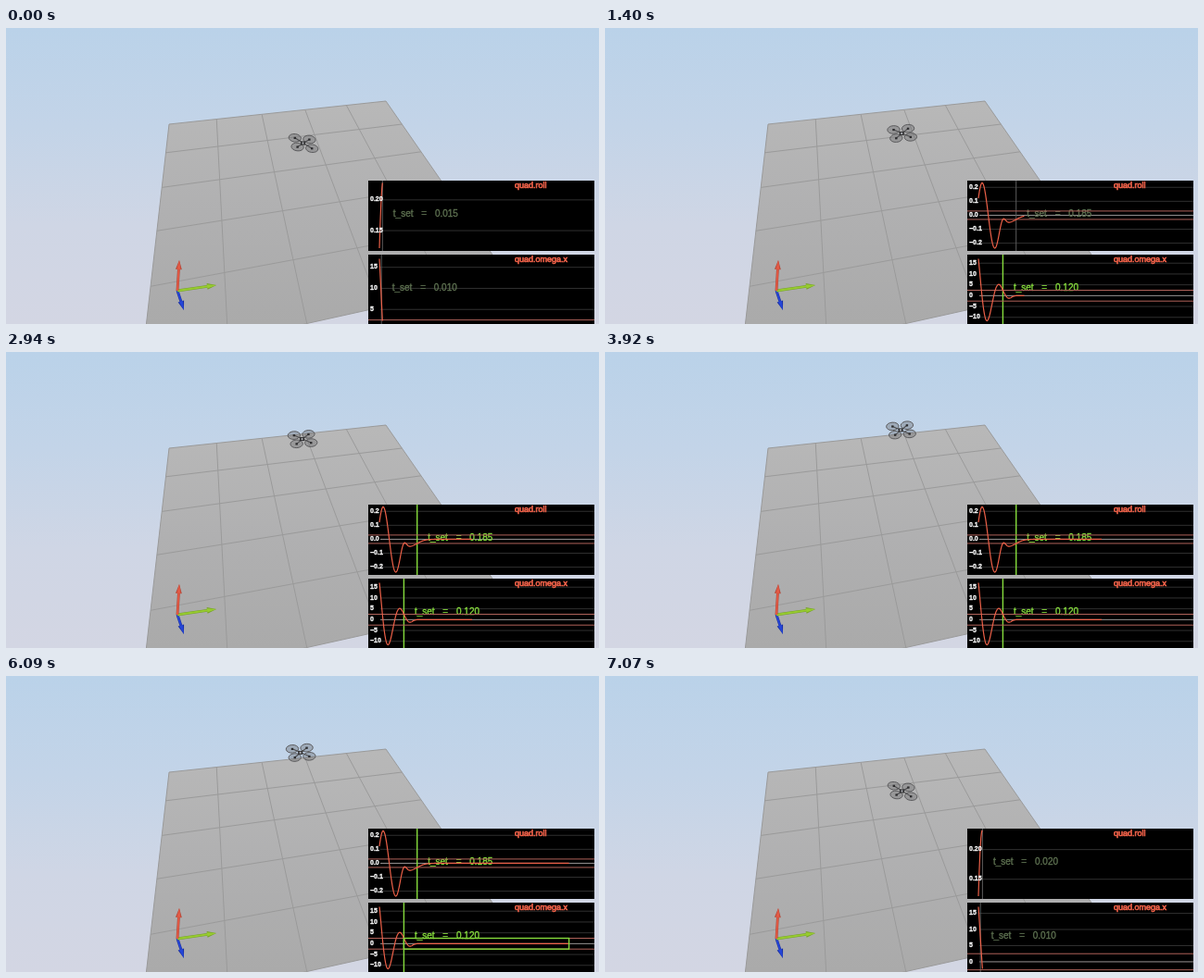
Write an HTML page with a canvas that moves like this. It is 640 by 320 pixels and loops after 7140 ms.

```html
<!DOCTYPE html>
<html lang="en">
<head>
<meta charset="utf-8">
<title>Quadcopter settling</title>
<style>
html, body { margin: 0; width: 100%; height: 100%; overflow: hidden; background: #c8d4e6; }
canvas { display: block; }
</style>
</head>
<body>
<canvas id="stage" width="640" height="320"></canvas>
<script>
const ctx = document.getElementById('stage').getContext('2d');
const STEP = 70, FRAMES = 102, RUN = 100;
const TOMATO = '#ec6048', GREEN = '#86dc3c';
const FONT = '"Liberation Sans", Arial, sans-serif';
const { PI, cos, sin, exp } = Math;

// Roll angle: one slowing swing that dies out, then a shallow dip below zero.
function roll(t) {
  const u = t - .0185;
  const swing = .232 * cos(54 * u - 60 * u * u) * exp(-((t / .12) ** 8));
  return swing - .052 * exp(-(((t - .145) / .055) ** 2));
}

// Roll rate: a damped sine that is cut off once settled.
const omega = t => -21 * exp(-13.4 * t - (t / .16) ** 8) * sin(54 * (t - .0175));

const droneX = p => 320.5 - 3.5 * p ** 1.5;
const droneY = p => 102.2 + 22.3 * cos(PI * (p * 1.37) ** .87);

const plots = [
  { name: 'quad.roll', fn: roll, band: .03, y: 165, h: 76, top: 167.5, bottom: 238, fine: .05, coarse: .1 },
  { name: 'quad.omega.x', fn: omega, band: 2.5, y: 245, h: 75, top: 249.5, bottom: 316.5, fine: 5, coarse: 5 }
];

// Perspective map of the unit square onto the floor's four corners.
function perspective([x0, y0], [x1, y1], [x2, y2], [x3, y3]) {
  const ax = x1 - x2, ay = y1 - y2, bx = x3 - x2, by = y3 - y2;
  const sx = x0 - x1 + x2 - x3, sy = y0 - y1 + y2 - y3, den = ax * by - bx * ay;
  const g = (sx * by - bx * sy) / den, h = (ax * sy - sx * ay) / den;
  return (u, v) => {
    const w = 1 + g * u + h * v;
    return [(x0 + (x1 - x0 + g * x1) * u + (x3 - x0 + h * x3) * v) / w,
            (y0 + (y1 - y0 + g * y1) * u + (y3 - y0 + h * y3) * v) / w];
  };
}
const corners = [[176, 104], [410, 79], [543, 271], [147, 359]];
const floor = perspective(...corners);

function line(color, width, ...pts) {
  ctx.strokeStyle = color;
  ctx.lineWidth = width;
  ctx.beginPath();
  pts.forEach(p => ctx.lineTo(...p));
  ctx.stroke();
}

function fill(color, ...pts) {
  ctx.fillStyle = color;
  ctx.beginPath();
  pts.forEach(p => ctx.lineTo(...p));
  ctx.fill();
}

function text(str, x, y, size, color, edge = .35, weight = '') {
  ctx.font = `${weight} ${size}px ${FONT}`;
  ctx.fillStyle = ctx.strokeStyle = color;
  ctx.lineWidth = edge;
  ctx.fillText(str, x, y);
  ctx.strokeText(str, x, y);
}

function gradient(y0, y1, ...colors) {
  const g = ctx.createLinearGradient(0, y0, 0, y1);
  colors.forEach((c, i) => g.addColorStop(i / (colors.length - 1), c));
  return g;
}

function arrow(x0, y0, x1, y1, color, dark) {
  const len = Math.hypot(x1 - x0, y1 - y0), dx = (x1 - x0) / len, dy = (y1 - y0) / len;
  const bx = x1 - dx * 10, by = y1 - dy * 10;
  const head = (c, w) => fill(c, [x1, y1], [bx - dy * w, by + dx * w], [bx + dy * w, by - dx * w]);
  line(dark, 2.8, [x0, y0], [bx, by]);
  line(color, 1.8, [x0, y0], [bx, by]);
  head(dark, 3.4);
  head(color, 2.2);
}

function scene() {
  ctx.fillStyle = gradient(0, 320, '#bad2e9', '#c3d4e8', '#cfd6e5', '#d3d6e3');
  ctx.fillRect(0, 0, 640, 320);
  fill(gradient(80, 320, '#b8b8b8', '#b0b0b1', '#aaaaaa'), ...corners);
  for (let i = 0; i <= 1; i += .2) {
    line('#9a9a9a', 1, floor(i, 0), floor(i, 1));
    line('#9a9a9a', 1, floor(0, i), floor(1, i));
  }
  arrow(185, 284, 192, 305, '#2546d8', '#182c9c');
  arrow(185, 284, 227, 278, '#98cc30', '#74a028');
  arrow(185, 284, 187, 251, '#e25a45', '#b04436');
}

function drone(x, y, tilt) {
  const rotors = [];
  for (const [dx, dy] of [[9.2, 4], [6.4, -5.2]])
    for (const side of [-1, 1]) rotors.push([x + .5 + side * dx, y + side * (dy + tilt * dx * .8)]);
  for (const [rx, ry] of rotors) {
    ctx.beginPath();
    ctx.ellipse(rx, ry, 6.7, 4.3, tilt * .8 - .06, 0, 2 * PI);
    ctx.fillStyle = 'rgba(95,95,98,.35)';
    ctx.fill();
    ctx.strokeStyle = '#5b5b5d';
    ctx.lineWidth = 1;
    ctx.stroke();
  }
  line('#4c4c4e', 1.1, rotors[0], rotors[1]);
  line('#4c4c4e', 1.1, rotors[2], rotors[3]);
  ctx.fillStyle = '#2c2c2e';
  rotors.forEach(([rx, ry]) => ctx.fillRect(rx - 1.2, ry - 1, 2.4, 2.2));
  ctx.fillRect(x - 2.5, y - 2, 5, 4);
  ctx.fillStyle = '#a9abb0';
  ctx.fillRect(x - 1, y - 1, 2, 2);
}

function plot({ name, fn, band, y, h, top, bottom, fine, coarse }, t) {
  const samples = [];
  for (let s = 0; s < t + 1e-6; s += .0025) samples.push([s, fn(s)]);
  const values = samples.map(p => p[1]);
  const hi = Math.max(...values), lo = Math.min(...values);
  const px = s => 403 + 220 * s;
  const py = v => top + (hi - v) / (hi - lo) * (bottom - top);
  const across = (v, x, color) => line(color, 1, [x, py(v)], [635, py(v)]);

  // Last sampled time outside the tolerance band.
  let settle = 0;
  for (let k = 0; k * .005 < t + 1e-6; k++) if (Math.abs(fn(k * .005)) > band) settle = k * .005;
  const held = t - settle, done = held >= .1, x = px(settle);

  ctx.save();
  ctx.beginPath();
  ctx.rect(391, y, 244, h);
  ctx.clip();
  ctx.fillStyle = '#000';
  ctx.fillRect(391, y, 244, h);

  const step = hi - lo < .2 ? fine : coarse;
  const digits = step < .1 ? 2 : step < 1 ? 1 : 0;
  const ticks = [];
  for (let k = Math.ceil(lo / step); k * step <= hi; k++) ticks.push(k * step);
  ticks.forEach(v => across(v, 404, v ? '#303030' : '#999594'));

  text(name, 549, y + 8, 9, TOMATO, .7);
  line(done ? GREEN : '#5c5c5c', done ? 1.4 : 1, [x, y], [x, y + h]);
  ctx.wordSpacing = '6px';
  text('t_set = ' + settle.toFixed(3), x + 11.5, y + 38.5, 10, done ? GREEN : '#5d7050');
  ctx.wordSpacing = '0px';

  across(band, 391, '#b0625a');
  across(-band, 391, '#b0625a');
  line(TOMATO, 1.2, ...samples.map(([s, v]) => [px(s), py(v)]));
  if (held >= .8) {
    ctx.strokeStyle = GREEN;
    ctx.lineWidth = 1.4;
    ctx.strokeRect(x, py(band), px(t) - x, py(-band) - py(band));
  }
  ticks.forEach(v => text(v.toFixed(digits).replace('-', '\u2212'), 393, py(v) + 1.6, 7, '#fff', .3, 'bold'));
  ctx.restore();
}

function draw(now) {
  const frame = Math.floor(now / STEP) % FRAMES;
  const t = Math.round((frame * .0105 + .015) % 1.055 / .005) * .005;
  const progress = frame % RUN / RUN;
  scene();
  drone(droneX(progress), droneY(progress), roll(t));
  plots.forEach(p => plot(p, t));
}

const start = performance.now();
function tick() {
  draw(performance.now() - start);
  requestAnimationFrame(tick);
}
tick();
</script>
</body>
</html>
```
